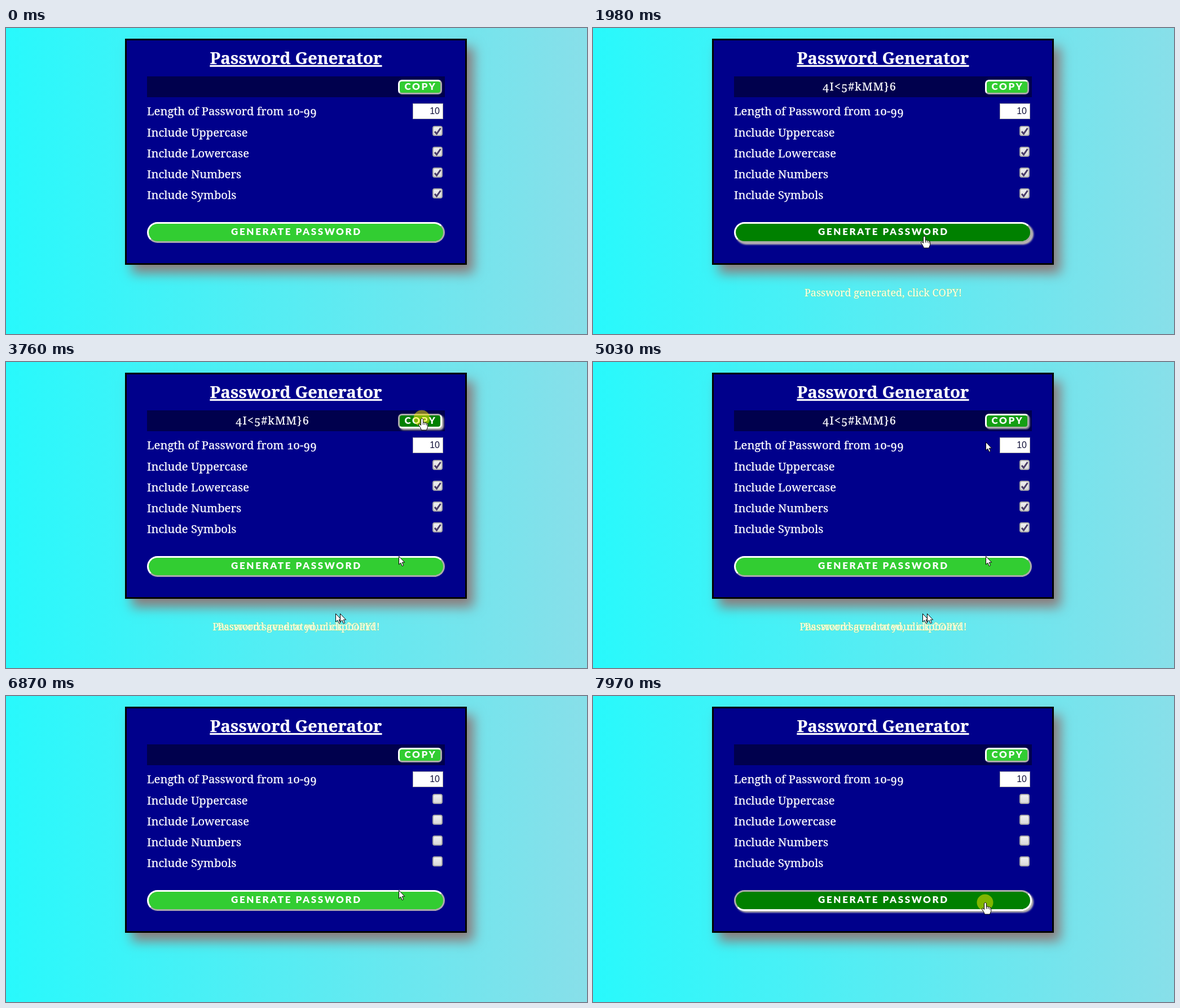
Animation, 1030 px wide and 544 px high, one loop 8 s. Source, as an HTML page with a canvas:

```html
<!DOCTYPE html>
<html lang="en">
<head>
<meta charset="utf-8">
<title>Password Generator</title>
<style>
  html, body { margin: 0; width: 100%; height: 100%; overflow: hidden; }
  #stage { position: relative; width: 1030px; height: 544px; overflow: hidden;
    background: linear-gradient(to right, #28f9fc, #88dfe9); }
  #stage div, svg, canvas { position: absolute; box-sizing: border-box; }
  svg, canvas { left: 0; top: 0; }
  #panel { left: 211px; top: 19px; width: 606px; height: 402px; background: #00008b;
    border: 3px solid #000; box-shadow: 12px 15px 20px #8c7c7c; }
  #output { left: 250px; top: 86px; width: 528px; height: 37px; background: rgba(0, 0, 0, .45); }
  .button { border: 3px outset #fff; }
  #copy { left: 695px; top: 92px; width: 78px; height: 26px; border-radius: 7px; }
  #generate { left: 250px; top: 345px; width: 528px; height: 37px; border-radius: 19px; }
  #count { left: 721px; top: 134px; width: 54px; height: 28px; background: #fff;
    border: 1px solid #aaa; }
  .box { left: 756px; width: 18px; height: 18px; border: 2px solid #aaa; border-radius: 4px;
    background: linear-gradient(#f0f0f0, #dadada); }
  text { font-family: "Noto Serif", serif; font-size: 20.2px; fill: #fff;
    stroke: #fff; stroke-width: .25px; font-variant-numeric: oldstyle-nums; }
  .mid { text-anchor: middle; }
  .title { font-size: 29.5px; font-weight: 700; text-decoration: underline;
    text-decoration-thickness: 2px; text-underline-offset: 3px; text-decoration-skip-ink: none; }
  .caps { font: 900 17px Lato, sans-serif; letter-spacing: 2.6px; stroke: none; }
  .number { font: 16px "Liberation Sans", sans-serif; fill: #101038; stroke: none;
    text-anchor: end; }
  .password { font-size: 19.8px; letter-spacing: 1px; }
  .note { font-size: 18px; fill: #fffff0; paint-order: stroke;
    stroke: rgba(190, 225, 70, .6); stroke-width: .8px; }
  .tick { fill: none; stroke: #493c68; stroke-width: 3px; }
</style>
</head>
<body>
<div id="stage">
  <div id="panel"></div>
  <div id="output"></div>
  <div id="copy" class="button"></div>
  <div id="count"></div>
  <div id="generate" class="button"></div>
  <svg id="words" width="1030" height="544">
    <text class="mid title" x="514" y="64">Password Generator</text>
    <text class="mid caps" x="735" y="110">COPY</text>
    <text x="250" y="155">Length of Password from 10-99</text>
    <text class="number" x="769" y="153">10</text>
    <text class="mid caps" x="515" y="368">GENERATE PASSWORD</text>
    <text id="password" class="mid password" x="472.5" y="111">4I&lt;5#kMM}6</text>
    <text id="ready" class="mid note" x="514.5" y="477">Password generated, click COPY!</text>
    <text id="saved" class="mid note" x="514.5" y="477">Password saved to your clipboard!</text>
    <g id="ticks"></g>
  </svg>
  <canvas id="pointer" width="1030" height="544"></canvas>
</div>
<script>
const LOOP = 8000, FADE = 370, RESET = 6870;
const CLICKS = { generate: 1190, copy: 3680, again: 7880 };
const PRESS = 80, RING = 150;
const $ = id => document.getElementById(id);
const ctx = $('pointer').getContext('2d');

['Uppercase', 'Lowercase', 'Numbers', 'Symbols'].forEach((name, i) => {
  const y = 37 * i;
  $('output').insertAdjacentHTML('afterend', `<div class="box" style="top:${174 + y}px"></div>`);
  $('words').insertAdjacentHTML('beforeend', `<text x="250" y="${193 + y}">Include ${name}</text>`);
  $('ticks').insertAdjacentHTML('beforeend', `<path class="tick" d="M760 ${184 + y}l3.5 4 7-10"/>`);
});

// Each visit is an entry point and eased moves between rests
const visits = [
  { enter: 110, leave: 6490, at: [883, 517], moves: [
    { from: 110, to: 890, end: [587, 377] },
    { from: 970, to: 1120, end: [587, 369] },
    { from: 1980, to: 2170, end: [588, 447] },
    { from: 2170, to: 2680, end: [725, 293] },
    { from: 2910, to: 3680, end: [737, 100] },
    { from: 4860, to: 5010, end: [696, 142] },
    { from: 5040, to: 5410, end: [769, 318] },
    { from: 5490, to: 5550, end: [791, 387] },
    { from: 5870, to: 6490, end: [873, 517], bend: [693, 425] }
  ] },
  { enter: 6940, leave: LOOP, at: [915, 518], moves: [
    { from: 6940, to: 7030, end: [925, 498] },
    { from: 7430, to: 7880, end: [695, 367], bend: [760, 372] }
  ] }
];

// Arrow copies left behind on screen until their area is repainted
const trails = [
  { at: [584, 447], from: 2140, to: RESET },
  { at: [592, 447], from: 2210, to: RESET },
  { at: [696, 345], from: 2350, to: 7600 }
];

const buttons = {
  generate: { left: 250, right: 778, top: 345, bottom: 381 },
  copy: { left: 695, right: 773, top: 92, bottom: 118 }
};

const arrow = new Path2D('M0 0V14.5L3.3 11.5 5.8 17.3 8.2 16.2 5.8 10.7H10.2Z');
const hand = new Path2D('M-2 1Q0-1.5 2 1V7Q3.6 5.8 5 7.4 6.6 6.6 8 8.4 10 8 10.2 10' +
  'V15L8 20.5H-1L-3 16-6 11.5Q-6 8.8-4 10L-2 12ZM2 7V11M5 8V11M8 9V12');

const easeOut = k => 1 - (1 - k) ** 2.5;
const during = (t, from, to) => t >= from && t < to;

function curve(a, bend, b, s) {
  return a.map((v, i) => {
    const mid = bend ? bend[i] : (v + b[i]) / 2;
    return (1 - s) ** 2 * v + 2 * s * (1 - s) * mid + s * s * b[i];
  });
}

function pointerAt(t) {
  const visit = visits.find(v => during(t, v.enter, v.leave));
  if (!visit) return null;
  let place = visit.at;
  for (const { from, to, end, bend } of visit.moves) {
    if (t < from) break;
    place = curve(place, bend, end, easeOut(Math.min(1, (t - from) / (to - from))));
  }
  return place;
}

function isOver(id, point) {
  const b = buttons[id];
  return point && point[0] >= b.left && point[0] <= b.right &&
    point[1] >= b.top && point[1] <= b.bottom;
}

// The share of the last FADE ms spent over a button gives a linear fade
function hoverLevel(id, t) {
  const samples = 40;
  let hits = 0;
  for (let i = 0; i < samples; i++) {
    if (isOver(id, pointerAt(t - i * FADE / samples))) hits++;
  }
  return hits / samples;
}

function clickedWithin(t, span) {
  return Object.values(CLICKS).some(at => during(t, at, at + span));
}

function paintButton(id, t, point) {
  const level = hoverLevel(id, t);
  const style = $(id).style;
  const rb = 50 * (1 - level);
  const offset = 3 * level;
  style.backgroundColor = `rgb(${rb}, ${205 - 77 * level}, ${rb})`;
  style.borderStyle = isOver(id, point) && clickedWithin(t, PRESS + 40) ? 'inset' : 'outset';
  style.boxShadow = `${offset}px ${offset}px ${offset}px rgba(190, 185, 180, ${level})`;
}

function drawPointer(shape, [x, y]) {
  ctx.save();
  ctx.translate(Math.round(x) + 0.5, Math.round(y) + 0.5);
  ctx.fillStyle = '#fff';
  ctx.strokeStyle = '#000';
  ctx.fill(shape);
  ctx.stroke(shape);
  ctx.restore();
}

function drawRing([x, y]) {
  ctx.fillStyle = 'rgba(255, 235, 0, .5)';
  ctx.beginPath();
  ctx.arc(x, y, 14.5, 0, Math.PI * 2);
  ctx.fill();
}

function show(id, visible) {
  $(id).style.visibility = visible ? 'visible' : 'hidden';
}

function render(t) {
  const point = pointerAt(t);
  for (const id in buttons) paintButton(id, t, point);
  const generated = during(t, CLICKS.generate + PRESS, RESET);
  show('password', generated);
  show('ready', generated);
  show('saved', during(t, CLICKS.copy + PRESS, RESET));
  show('ticks', t < RESET);

  ctx.clearRect(0, 0, 1030, 544);
  for (const { at, from, to } of trails) {
    if (during(t, from, to)) drawPointer(arrow, at);
  }
  if (!point) return;
  if (clickedWithin(t, RING)) drawRing(point);
  const over = Object.keys(buttons).some(id => isOver(id, point));
  drawPointer(over ? hand : arrow, point);
}

const start = performance.now();
function tick() {
  render((performance.now() - start) % LOOP);
  requestAnimationFrame(tick);
}
tick();
</script>
</body>
</html>
```
